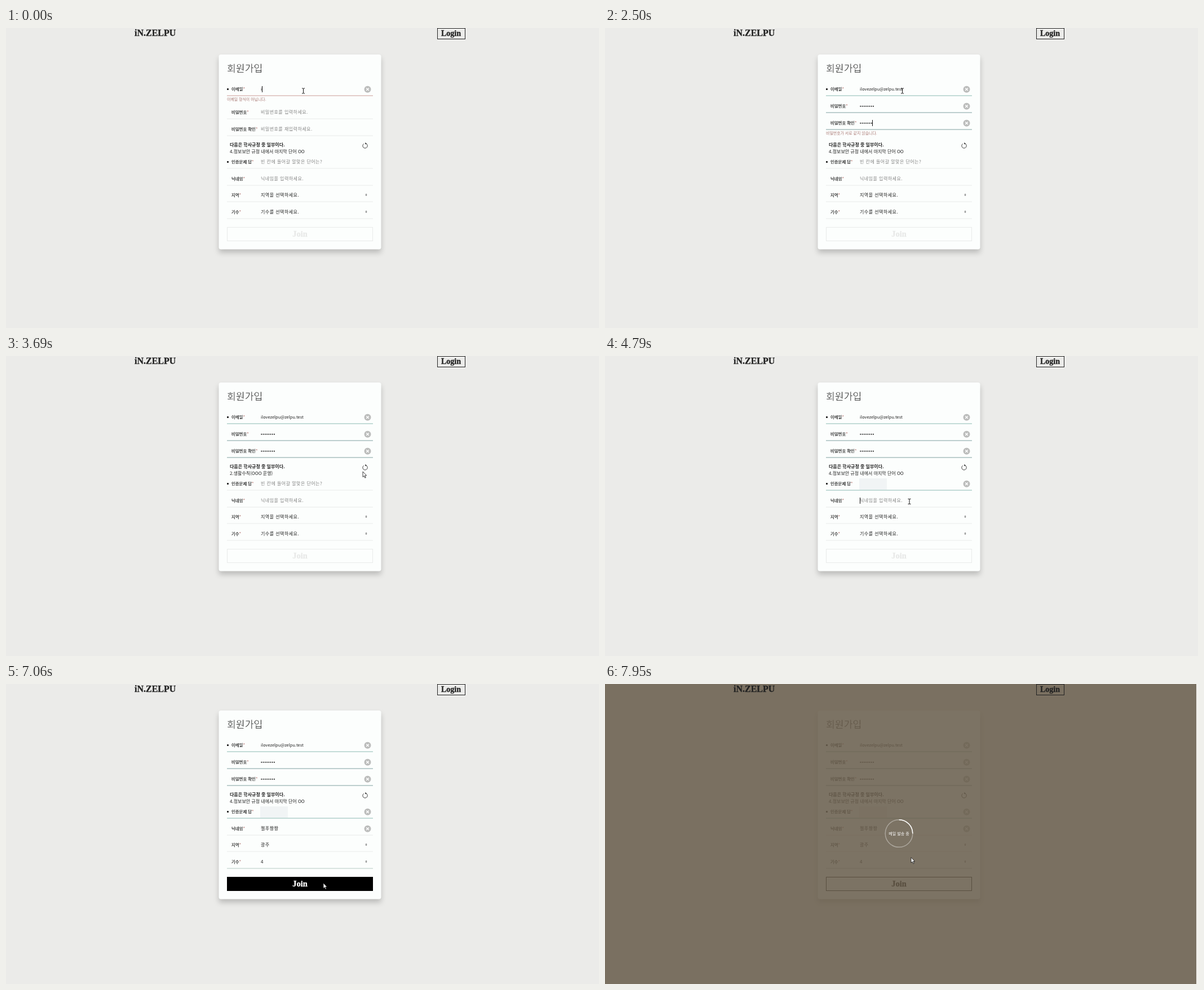
Animation, 1052 px wide and 532 px high, one loop 7.99 s. Source, as an HTML page:

```html
<!DOCTYPE html>
<html lang="ko">
<head>
<meta charset="utf-8">
<title>회원가입</title>
<style>
  html, body { margin: 0; width: 100%; height: 100%; overflow: hidden; background: #ebebe9; }
  svg { display: block; width: 1052px; height: 532px; font-family: "Noto Sans CJK KR", "Noto Sans CJK", "Noto Sans", sans-serif; }
  text { white-space: pre; }
  .brand { font-family: "Liberation Serif", serif; font-weight: 700; stroke-width: .3px; }
  .title { font-size: 17.2px; font-weight: 300; fill: #222; stroke: #fcfefd; stroke-width: .45px; }
  .label { font-size: 7.4px; fill: #1c1c1c; stroke: #1c1c1c; stroke-width: .2px; }
  .label tspan { fill: #a8605c; stroke: none; }
  .value { font-size: 8px; letter-spacing: .48px; fill: #222; }
  .hint { fill: #858585; }
  .mail { font-size: 7.4px; letter-spacing: 0; }
  .error { font-size: 6.95px; fill: #a87772; }
  .quiz { font-size: 8px; fill: #222; }
  #card { fill: #fcfefd; filter: drop-shadow(0 6px 5px rgba(0, 0, 0, .2)); }
</style>
</head>
<body>
<svg id="stage" viewBox="0 0 1052 532"></svg>
<script>
const LOOP = 7990;
const MAIL = 'ilovezelpu@zelpu.test';
const NICK = '젤푸짱짱';
const TEAL = '#8ab9b1', SLATE = '#7f9f9f', PALE = '#e9ebea', RED = '#cb9a96';
const QUIZ = [
  [0, '4.정보보안 규정 내에서 마지막 단어 OO'],
  [3400, '1.출결 규정(OO 인정)'],
  [3520, '2.생활수칙(OOO 운영)'],
  [3880, '3.평가 규정 내에서 OO 기준'],
  [4040, '4.정보보안 규정 내에서 마지막 단어 OO']
];
// time, x, y, shape
const POINTER = [
  [0, 527.5, 111.5, 'beam'], [2830, 527.5, 111.5, 'beam'], [2980, 580, 158, 'arrow'], [3190, 633, 205, 'arrow'],
  [4380, 633, 205, 'arrow'], [4460, 540, 229, 'beam'], [4680, 540, 229, 'beam'], [4740, 540, 258, 'beam'],
  [5210, 540, 258, 'beam'], [5300, 560, 287, 'arrow'], [5400, 560, 287, 'arrow'], [5460, 560, 317, 'arrow'],
  [5570, 560, 317, 'arrow'], [5680, 508, 347, 'hand'], [5980, 508, 347, 'hand'], [6010, 515, 343, 'arrow'],
  [6120, 665, 274, 'arrow'], [6150, 665, 274, 'arrow'], [6270, 563, 353, 'arrow'], [7300, 563, 353, 'arrow'],
  [7830, 545, 310, 'arrow'], [7950, 543, 307.5, 'arrow']
];

const bullet = '<rect x="392" y="-1" width="3" height="3" rx=".8" fill="#222"/>';
const clear = '<g class="clear"><circle cx="641.5" cy=".7" r="6" fill="#bcbdbc"/>' +
  '<path d="M639.2-1.6l4.6 4.6m0-4.6l-4.6 4.6" stroke="#fff" stroke-width="1.4"/></g>';
const chevron = '<path d="M637.4-.5l1.6-1.7 1.6 1.7zM637.4 .3l1.6 1.7 1.6-1.7z" fill="#666"/>';

function row(id, label, extra, kind = '') {
  return `<g id="${id}">${extra}
    <text class="label" x="400" y="3">${label}<tspan>*</tspan></text>
    <text class="value ${kind}" x="452" y="3.4"></text>
    <path class="dots" fill="none" stroke="#222" stroke-width="2.1" stroke-linecap="round"/>
    <path class="line" d="M392 12H651"/>
    <text class="error" x="392" y="21.2"></text></g>`;
}

const stage = document.getElementById('stage');
stage.innerHTML = `
  <rect width="1052" height="532" fill="#ebebe9"/>
  <rect id="card" x="377.5" y="47" width="288" height="345" rx="4"/>
  <text class="title" x="392" y="78.4">회원가입</text>
  ${row('mail', '이메일', bullet + clear, 'mail')}
  ${row('pass', '비밀번호', clear)}
  ${row('again', '비밀번호 확인', clear)}
  <g id="quiz">
    <text class="quiz" x="397" y="199.4" font-weight="700">다음은 학사규정 중 일부이다.</text>
    <text class="quiz" id="question" x="397" y="211"></text>
    <path d="M638.4 193.9A4.2 4.2 0 1 1 634.8 194.3" fill="none" stroke="#333" stroke-width=".95"/>
    <path d="M637.2 192l2.6 1.8-2.6 1.7z" fill="#333"/>
  </g>
  ${row('answer', '인증문제 답', bullet + clear)}
  <rect id="mask" x="451" y="217" width="49" height="20" fill="#f1f4f5"/>
  ${row('nick', '닉네임', clear)}
  ${row('area', '지역', chevron)}
  ${row('term', '기수', chevron)}
  <g id="join">
    <rect x="392.5" y="342.5" width="258" height="24"/>
    <text class="brand" x="521.5" y="359" font-size="14.5" text-anchor="middle">Join</text>
  </g>
  <path id="caret" d="M0-5.5v11" stroke="#111"/>
  <rect id="veil" width="1049" height="532" fill="rgba(104,92,75,.86)"/>
  <rect id="strip" x="1049" width="3" height="532" fill="#efedea"/>
  <text class="brand" x="228" y="14.3" font-size="16" fill="#222" stroke="#222">iN.ZELPU</text>
  <rect x="765.5" y=".5" width="49" height="19" fill="none" stroke="#222"/>
  <text class="brand" x="772" y="14.4" font-size="14" fill="#222" stroke="#222">Login</text>
  <g id="busy" transform="translate(521.5 265)" fill="none" stroke-width="1.5">
    <circle r="24.3" stroke="#fff" stroke-opacity=".36"/>
    <path id="arc" d="M-17.2-17.2A24.3 24.3 0 0 1 17.2-17.2" stroke="#fff"/>
    <text id="busyText" y="2.8" fill="#fff" font-weight="500" text-anchor="middle">메일 발송 중</text>
  </g>
  <g id="pointer">
    <path id="beam" d="M-2.5-4.5H-.6L0-4l.6-.5h1.9M0-4V4M-2.5 4.5H-.6L0 4l.6.5h1.9" fill="none" stroke="#111"/>
    <path id="arrow" d="M0 0V9.5L2.2 7.6 3.8 11.2 5.3 10.5 3.7 7H6.6Z" fill="#fff" stroke="#111" stroke-width=".8"/>
    <path id="hand" d="M-1 0h2v4.5l6 1.6v4L5.2 13.5H-.6L-4.4 7.6l1.3-1 2.1 1.8z" fill="#fff" stroke="#111" stroke-width=".6"/>
  </g>`;

const $ = id => document.getElementById(id);
const part = (id, name) => $(id).querySelector('.' + name);
const show = (el, on) => el.style.display = on ? '' : 'none';
const move = (el, x, y) => el.setAttribute('transform', `translate(${x} ${y})`);
const within = (t, a, b) => t >= a && t < b;

// Characters present after typing n of them evenly, first at a and last at b.
const typed = (t, a, b, n) => t < a ? 0 : Math.min(n, 1 + Math.floor((t - a) / (b - a) * (n - 1) + 1e-6));
const latest = (table, t) => table.filter(k => k[0] <= t).pop();

function setLine(id, colour, width = 1) {
  const line = part(id, 'line');
  line.setAttribute('stroke', colour);
  line.setAttribute('stroke-width', width);
}

function setValue(id, value, hint) {
  const el = part(id, 'value');
  el.textContent = value || hint;
  el.classList.toggle('hint', !value && !!hint && id !== 'area' && id !== 'term');
}

function setDots(id, n, hint) {
  setValue(id, '', n ? '' : hint);
  part(id, 'dots').setAttribute('d', Array.from({ length: n }, (_, i) => `M${453.3 + i * 3.25} .7h.01`).join(''));
}

function setError(id, text) {
  part(id, 'error').textContent = text;
  return text ? 11 : 0;
}

function drawPointer(t) {
  const i = POINTER.findLastIndex(k => k[0] <= t);
  const a = POINTER[i], b = POINTER[i + 1] || a;
  const p = b === a ? 0 : (t - a[0]) / (b[0] - a[0]);
  const e = p * p * (3 - 2 * p);
  move($('pointer'), a[1] + (b[1] - a[1]) * e, a[2] + (b[2] - a[2]) * e);
  for (const shape of ['beam', 'arrow', 'hand']) show($(shape), shape === a[3]);
}

function drawJoin(ready, busy) {
  const [box, text] = $('join').children;
  box.setAttribute('fill', ready && !busy ? '#000' : 'none');
  box.setAttribute('stroke', ready ? '#000' : PALE);
  const ink = busy ? '#000' : ready ? '#fff' : '#e8e9e8';
  text.setAttribute('fill', ink);
  text.setAttribute('stroke', ink);
}

function draw(t) {
  const mailDone = t >= 1710;
  const mailCount = t < 30 ? 1 : t < 790 ? 1 + typed(t, 30, 580, 6) : 7 + typed(t, 790, 1090, 4);
  const passCount = typed(t, 1770, 2080, 8);
  const againCount = t >= 2630 ? 8 : typed(t, 2140, 2500, 7);
  const answered = t >= 4500;
  const nickCount = typed(t, 4800, 5100, 4);
  const areaDone = t >= 5380, termDone = t >= 5560;
  const termFocus = within(t, 5460, 6130);
  const busy = t >= 7110;

  setValue('mail', mailDone ? MAIL : MAIL.slice(0, mailCount), '');
  setDots('pass', passCount, '비밀번호를 입력하세요.');
  setDots('again', againCount, '비밀번호를 재입력하세요.');
  setValue('answer', '', answered ? '' : '빈 칸에 들어갈 알맞은 단어는?');
  setValue('nick', NICK.slice(0, nickCount), '닉네임을 입력하세요.');
  setValue('area', areaDone ? '광주' : '', '지역을 선택하세요.');
  setValue('term', termDone ? '4' : '', '기수를 선택하세요.');
  $('question').textContent = latest(QUIZ, t)[1];

  const filled = { mail: true, pass: passCount, again: againCount, answer: answered, nick: nickCount };
  for (const id in filled) show(part(id, 'clear'), filled[id]);
  show($('mask'), answered);

  const mailGap = setError('mail', mailDone ? '' : '이메일 형식이 아닙니다.');
  const passGap = mailGap + setError('pass', within(t, 1710, 2140) ? '비밀번호는 8자 이상입니다.' : '');
  const gap = passGap + setError('again', within(t, 2140, 2630) ? '비밀번호가 서로 같지 않습니다.' : '');
  const y = { mail: 108, pass: 138 + mailGap, again: 168 + passGap, answer: 226 + gap,
    nick: 256 + gap, area: 285 + gap, term: 315 + gap };
  for (const id in y) move($(id), 0, y[id]);
  move($('quiz'), 0, gap);
  move($('join'), 0, gap);
  $('card').setAttribute('height', 334.5 + gap);

  setLine('mail', mailDone ? TEAL : RED);
  setLine('pass', !mailDone ? PALE : t < 2080 ? RED : SLATE);
  setLine('again', againCount ? SLATE : PALE);
  setLine('answer', answered ? TEAL : PALE);
  setLine('nick', PALE);
  setLine('area', within(t, 5300, 5440) ? '#333' : PALE);
  setLine('term', termFocus ? '#2c2c2c' : t >= 6130 ? '#b5cac2' : PALE, termFocus ? 1.4 : 1);
  drawJoin(termDone, busy);

  const focus = t < 1710 ? 'mail' : t < 2110 ? 'pass' : t < 2830 ? 'again' : within(t, 4740, 5210) ? 'nick' : '';
  show($('caret'), focus && !within(t, 1290, 1450));
  if (focus) {
    const dots = focus === 'pass' ? passCount : againCount;
    const width = focus === 'mail' ? part('mail', 'value').getComputedTextLength()
      : focus === 'nick' ? nickCount && part('nick', 'value').getComputedTextLength() : dots * 3.25;
    move($('caret'), Math.floor(452 + width) + .5, y[focus] + .5);
  }

  for (const id of ['veil', 'strip', 'busy']) show($(id), busy);
  if (busy) {
    const s = t - 7110;
    $('arc').setAttribute('transform', `rotate(${s * 405 / 840})`);
    $('busyText').setAttribute('font-size', 7.4 + .35 * Math.cos(s / 560 * 2 * Math.PI));
  }
  drawPointer(t);
}

const start = performance.now();
function tick() {
  draw((performance.now() - start) % LOOP);
  requestAnimationFrame(tick);
}
tick();
</script>
</body>
</html>
```
